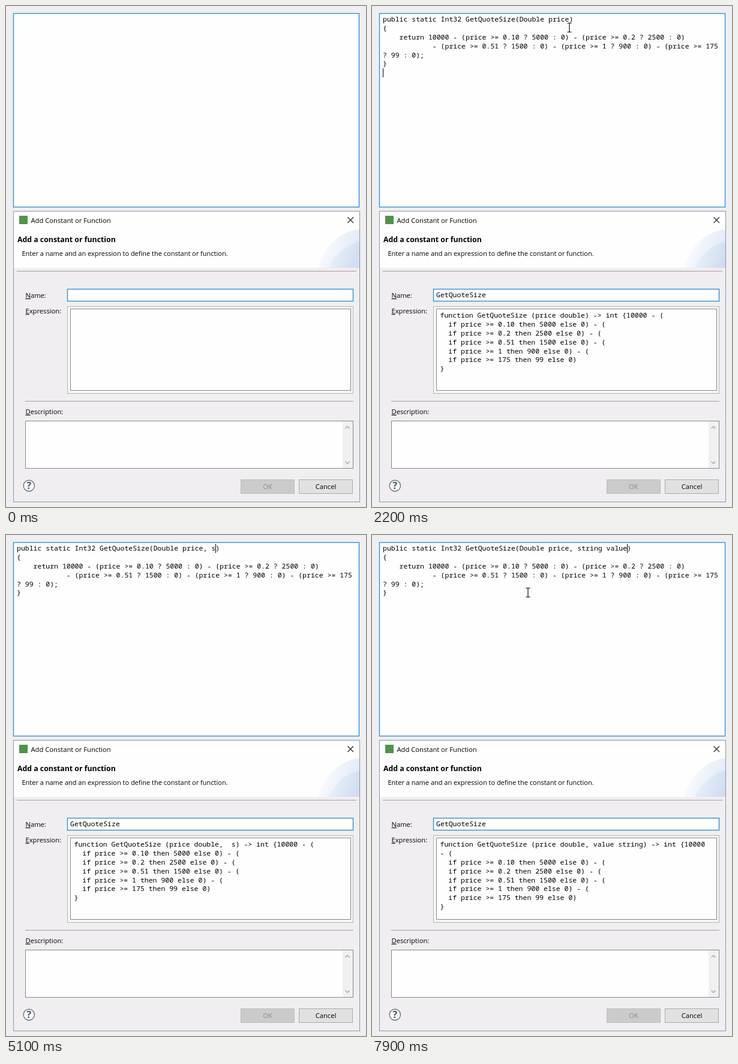
An HTML page for the animation above (8000 ms loop, 600x836 px).

```html
<!DOCTYPE html>
<html lang="en">
<head>
<meta charset="utf-8">
<title>Add Constant or Function</title>
<style>
  html, body { margin: 0; width: 100%; height: 100%; overflow: hidden; background: #f0eef0; }
  svg { display: block; }
  text { font: 500 11.2px "Open Sans", sans-serif; fill: #000; white-space: pre; }
  .head { font-size: 12.3px; font-weight: 700; }
  .sub { font-size: 11px; }
  .mid { text-anchor: middle; }
  .u { text-decoration: underline; }
  .code text { font: 500 11.5px "Noto Sans Mono", monospace; }
  .box { fill: #fffeff; stroke: #858788; }
  .focus { fill: #fffeff; stroke: #2f93d8; stroke-width: 1.4; }
  .rule { stroke: #a0a0a0; }
  .chev { fill: none; stroke: #a9a9a9; stroke-width: 1.5; }
</style>
</head>
<body>
<svg width="600" height="836" viewBox="0 0 600 836">
  <defs>
    <linearGradient id="sky" gradientUnits="userSpaceOnUse" x1="520" y1="400" x2="592" y2="424">
      <stop offset="0" stop-color="#fcfdfe"/>
      <stop offset="1" stop-color="#dde7f5"/>
    </linearGradient>
    <linearGradient id="glow" gradientUnits="userSpaceOnUse" x1="540" y1="410" x2="592" y2="430">
      <stop offset="0" stop-color="#d3e0f3" stop-opacity="0.2"/>
      <stop offset="1" stop-color="#c6d6ef" stop-opacity="0.7"/>
    </linearGradient>
    <clipPath id="banner"><rect x="515" y="373" width="74" height="64"/></clipPath>
  </defs>

  <rect class="focus" x="12.5" y="12.5" width="576" height="323"/>

  <!-- dialog -->
  <rect x="12.5" y="342.5" width="577" height="485" fill="#f0eef0" stroke="#8b979e"/>
  <rect x="13" y="343" width="576" height="94" fill="#fffeff"/>
  <g clip-path="url(#banner)">
    <circle cx="602" cy="454" r="83" fill="url(#sky)"/>
    <circle cx="610" cy="470" r="80" fill="url(#glow)"/>
  </g>
  <path class="rule" d="M18 442.5H584M32 659.5H579"/>
  <rect x="22" y="350" width="14" height="14" fill="#4f9447"/>
  <path d="M569.5 352.5l9.5 9.5m0-9.5l-9.5 9.5" stroke="#222" stroke-width="1.1"/>
  <text x="41.5" y="361.5">Add Constant or Function</text>
  <text class="head" x="19" y="394">Add a constant or function</text>
  <text class="sub" x="26.5" y="417">Enter a name and an expression to define the constant or function.</text>

  <text x="32.5" y="487"><tspan class="u">N</tspan>ame:</text>
  <rect class="focus" x="102.5" y="472.5" width="476" height="20"/>
  <text x="32.5" y="513"><tspan class="u">E</tspan>xpression:</text>
  <rect x="102.5" y="501.5" width="476" height="145" fill="#f7f7f7" stroke="#b4b4b4"/>
  <rect class="box" x="107.5" y="505.5" width="467" height="136"/>
  <text x="32.5" y="681"><tspan class="u">D</tspan>escription:</text>
  <rect class="box" x="32.5" y="692.5" width="546" height="79"/>
  <rect x="561" y="693" width="17" height="78" fill="#f0f0f0"/>
  <path class="chev" d="M565.5 705l3.5-3.5 3.5 3.5M565.5 760l3.5 3.5 3.5-3.5"/>

  <circle cx="38.3" cy="800.5" r="9.2" fill="#f6f7f9" stroke="#6d7480" stroke-width="1.4"/>
  <text class="mid" x="38.3" y="806.2" style="font-size:16px;font-weight:700;fill:#4a5462">?</text>
  <rect x="391.5" y="790.5" width="89" height="23" fill="#cccbcc" stroke="#bdbdbd"/>
  <text class="mid" x="436" y="806.3" style="fill:#8a8a8a">OK</text>
  <rect x="488.5" y="790.5" width="89" height="23" fill="#e1e1e1" stroke="#a9a9a9"/>
  <text class="mid" x="533" y="806.3">Cancel</text>

  <g class="code">
    <g id="source"></g>
    <text id="name" x="107" y="485.8"></text>
    <g id="expr"></g>
  </g>
  <rect id="caret" width="1" height="15"/>
  <path id="mouse" d="M-3.5-7.5H-1Q0-7.5 0-6.5Q0-7.5 1-7.5H3.5M0-6.5V6.5M-3.5 7.5H-1Q0 7.5 0 6.5Q0 7.5 1 7.5H3.5"
        fill="none" stroke="#111" stroke-width="1.2"/>
</svg>
<script>
const LOOP = 8000, TICK = 100, BLINK = 530;
const CHAR = 6.9, LINE = 14.83, WRAP = 65;
const PASTE = 700, CONVERT = 800, CLICK = 2800, STEP_LEFT = 4200;
const SIGNATURE = 'public static Int32 GetQuoteSize(Double price';
const TYPED = ', string value';
const KEYS = [4600, 4800, 5050, 5170, 5280, 5390, 5500, 5610, 5710, 5830, 5940, 6080, 6250, 6400];

const BODY = [
  '{',
  '    return 10000 - (price >= 0.10 ? 5000 : 0) - (price >= 0.2 ? 2500 : 0)',
  '            - (price >= 0.51 ? 1500 : 0) - (price >= 1 ? 900 : 0) - (price >= 175',
  '? 99 : 0);',
  '}'
];
const TERMS = [
  '  if price >= 0.10 then 5000 else 0) - (',
  '  if price >= 0.2 then 2500 else 0) - (',
  '  if price >= 0.51 then 1500 else 0) - (',
  '  if price >= 1 then 900 else 0) - (',
  '  if price >= 175 then 99 else 0)',
  '}'
];

// Pointer visits: [time, x, y]
const MOVES = [
  [[900, 300, 250], [1100, 275, 215], [1550, 275, 215], [2200, 329, 36],
   [2500, 335, 23], [2850, 335, 23], [3300, 422, 193], [4600, 422, 193]],
  [[7500, 422, 193], [7900, 260, 96], [8000, 260, 96]]
];

const $ = id => document.getElementById(id);

function setLines(group, lines, x, y) {
  const key = lines.join('\n');
  if (group.dataset.key === key) return;
  group.dataset.key = key;
  group.replaceChildren(...lines.map((line, i) => {
    const el = document.createElementNS('http://www.w3.org/2000/svg', 'text');
    el.setAttribute('x', x);
    el.setAttribute('y', y + i * LINE);
    el.textContent = line;
    return el;
  }));
}

function wrap(line) {
  if (line.length <= WRAP) return [line];
  const cut = line.lastIndexOf(' ', WRAP);
  return [line.slice(0, cut), ...wrap(line.slice(cut + 1))];
}

function convert(typed) {
  const [type = '', name = ''] = typed.slice(2).split(' ');
  const extra = typed ? `, ${name} ${type}` : '';
  return [...wrap(`function GetQuoteSize (price double${extra}) -> int {10000 - (`), ...TERMS];
}

function pointerAt(t) {
  const path = MOVES.find(p => t >= p[0][0] && t < p[p.length - 1][0]);
  if (!path) return null;
  const i = path.findIndex(p => p[0] > t);
  const [t0, x0, y0] = path[i - 1], [t1, x1, y1] = path[i];
  const k = (t - t0) / (t1 - t0), e = k * k * (3 - 2 * k);
  return [x0 + (x1 - x0) * e, y0 + (y1 - y0) * e];
}

function drawCaret(t, count) {
  let since = PASTE, col = 0, row = 6;
  if (t >= CLICK) [since, col, row] = [CLICK, SIGNATURE.length + 1, 0];
  if (t >= STEP_LEFT) [since, col] = [STEP_LEFT, SIGNATURE.length + count];
  if (count) since = KEYS[count - 1];
  const on = t >= PASTE && Math.floor((t - since) / BLINK) % 2 === 0;
  const caret = $('caret');
  caret.setAttribute('x', Math.round(18 + col * CHAR));
  caret.setAttribute('y', Math.round(15 + row * LINE));
  caret.style.visibility = on ? 'visible' : 'hidden';
}

function draw(now) {
  const t = Math.floor(now % LOOP / TICK) * TICK;
  const count = KEYS.filter(k => k <= t).length;
  const typed = TYPED.slice(0, count);

  setLines($('source'), t < PASTE ? [] : [SIGNATURE + typed + ')', ...BODY], 18, 26.2);
  setLines($('expr'), t < CONVERT ? [] : convert(typed), 113.5, 520.2);
  $('name').textContent = t < CONVERT ? '' : 'GetQuoteSize';
  drawCaret(t, count);

  const at = pointerAt(t), mouse = $('mouse');
  mouse.style.visibility = at ? 'visible' : 'hidden';
  if (at) mouse.setAttribute('transform', `translate(${at.map(Math.round)})`);
}

const start = performance.now();
function loop() {
  draw(performance.now() - start);
  requestAnimationFrame(loop);
}
loop();
</script>
</body>
</html>
```
